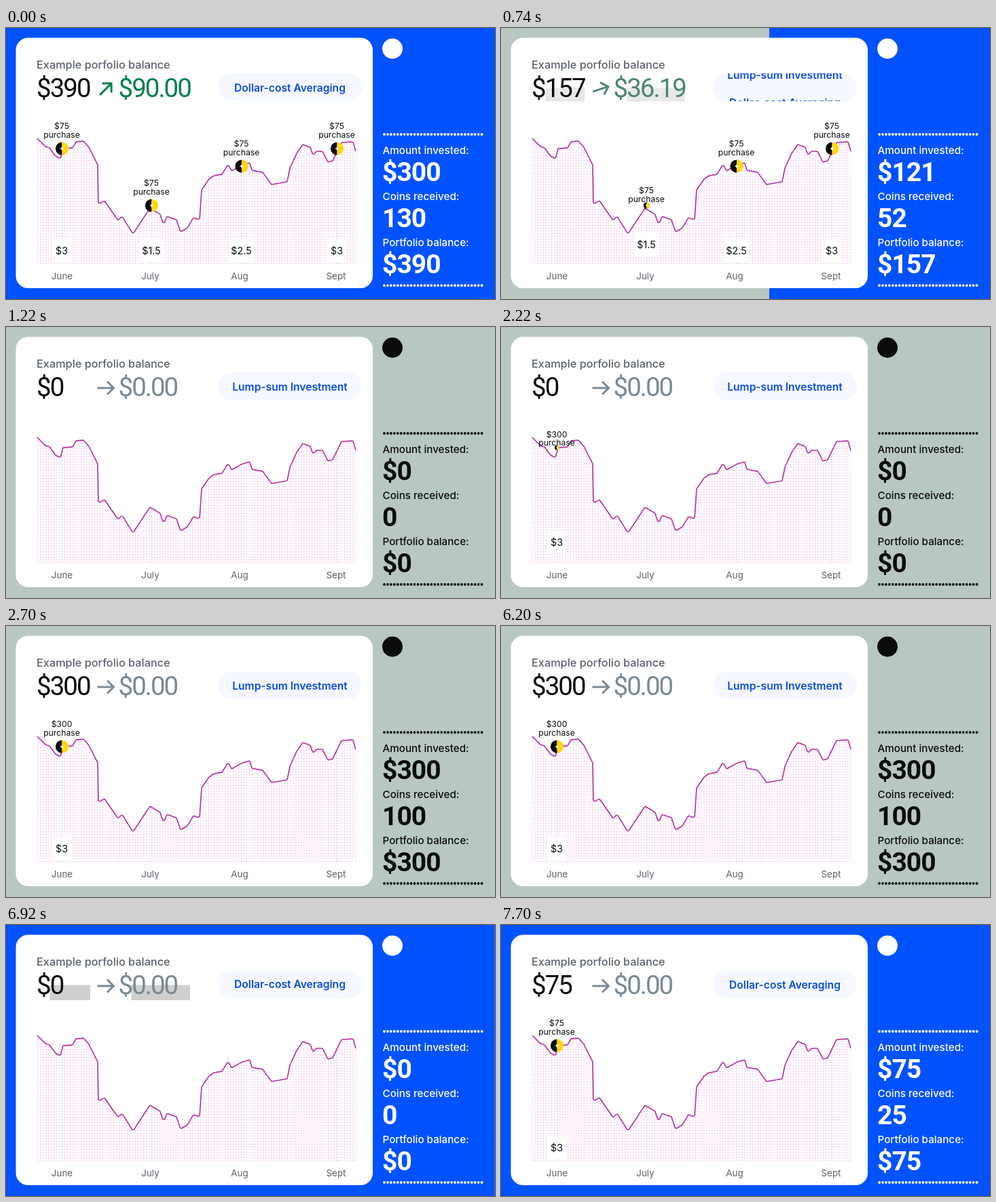
Animation of 720 by 400 pixels, one loop 8 s. Source, as an HTML page with a canvas:

```html
<!DOCTYPE html>
<html lang="en">
<head>
<meta charset="utf-8">
<title>Portfolio balance</title>
<style>
html, body { margin: 0; width: 100%; height: 100%; overflow: hidden; background: #0052ff; }
canvas { display: block; width: 720px; height: 400px; }
</style>
</head>
<body>
<canvas id="stage" width="720" height="400"></canvas>
<script>
const ctx = document.getElementById('stage').getContext('2d');
const LOOP = 8000, STEP = 60;
const BLUE = '#0052ff', SAGE = '#b9c7c3', INK = '#0a0b0d';
const SANS = 'Inter, sans-serif', DIGITS = 'Roboto, sans-serif';

// Turning points of the price, x and y in turn
const LINE = [46,163, 58,175, 64,177, 73,189, 80,193, 84,178, 98,177, 103,168, 114,167,
  122,176, 135,202, 136,260, 145,255, 165,284, 171,278, 187,304, 202,281, 212,266,
  227,275, 232,291, 237,278, 251,283, 257,301, 267,295, 276,280, 285,283, 288,239,
  299,223, 306,218, 318,216, 327,201, 332,211, 348,202, 359,199, 362,210, 378,213,
  391,231, 414,227, 418,207, 428,185, 437,172, 448,176, 452,188, 457,182, 466,182,
  474,198, 481,196, 494,169, 511,168];
const END = { x: 515, y: 182 };

const MARKS = [
  { month: 'June', mx: 82.5, x: 82.5, y: 178, price: '$3' },
  { month: 'July', mx: 212.5, x: 214.5, y: 262, price: '$1.5' },
  { month: 'Aug', mx: 344, x: 347, y: 204, price: '$2.5' },
  { month: 'Sept', mx: 486, x: 487.5, y: 178, price: '$3' }
];

const clamp = v => Math.max(0, Math.min(1, v));
const lerp = (a, b, k) => a + (b - a) * k;
const easeOut = k => 1 - Math.pow(1 - clamp(k), 3);
const sweep = k => 1 - Math.pow(1 - Math.pow(clamp(k), 1.4), 3.73);
const mix = (a, b, k) => `rgb(${a.map((v, i) => Math.round(lerp(v, b[i], k)))})`;
const elapsed = (t, start) => Math.floor((t - start) / STEP + 1e-6) * STEP;

function text(str, x, y, font, color, align = 'left', spacing = 0) {
  ctx.font = font;
  ctx.fillStyle = color;
  ctx.textAlign = align;
  ctx.letterSpacing = spacing + 'px';
  ctx.fillText(str, x, y);
}

function box(x, y, w, h, r, color) {
  ctx.fillStyle = color;
  ctx.beginPath();
  ctx.roundRect(x, y, w, h, r);
  ctx.fill();
}

function clipped(x, y, w, h, draw) {
  ctx.save();
  ctx.beginPath();
  ctx.rect(x, y, w, h);
  ctx.clip();
  draw();
  ctx.restore();
}

function tracePrice(g) {
  g.beginPath();
  g.moveTo(LINE[0], LINE[1]);
  for (let i = 2; i < LINE.length; i += 2) {
    const nx = LINE[i + 2] ?? END.x, ny = LINE[i + 3] ?? END.y;
    g.arcTo(LINE[i], LINE[i + 1], nx, ny, 2);
  }
  g.lineTo(END.x, END.y);
}

function makeChart() {
  const c = document.createElement('canvas');
  c.width = 720;
  c.height = 400;
  const g = c.getContext('2d');
  g.save();
  tracePrice(g);
  g.lineTo(516, 349);
  g.lineTo(45, 349);
  g.closePath();
  g.clip();
  g.fillStyle = '#fffafe';
  g.fillRect(45, 150, 472, 199);
  g.fillStyle = '#e9bfe5';
  for (let y = 151; y < 349; y += 4) {
    for (let x = 46; x < 517; x += 4) g.fillRect(x, y, 1.2, 1.2);
  }
  g.strokeStyle = '#b5daf2';
  g.setLineDash([2, 2]);
  for (const m of MARKS) {
    g.beginPath();
    g.moveTo(m.x, 150);
    g.lineTo(m.x, 348);
    g.stroke();
  }
  g.restore();
  tracePrice(g);
  g.strokeStyle = '#b02f9d';
  g.lineWidth = 1.6;
  g.lineJoin = 'round';
  g.stroke();
  return c;
}
const chart = makeChart();

function coin(x, y, r) {
  ctx.fillStyle = INK;
  ctx.beginPath();
  ctx.arc(x, y, r, Math.PI / 2, Math.PI * 1.5);
  ctx.fill();
  ctx.fillStyle = '#ffd60f';
  ctx.beginPath();
  ctx.arc(x, y, r, -Math.PI / 2, Math.PI / 2);
  ctx.fill();
  const s = r * 0.45;
  ctx.fillStyle = '#fff';
  ctx.beginPath();
  ctx.moveTo(x, y - s);
  ctx.quadraticCurveTo(x, y, x + s, y);
  ctx.quadraticCurveTo(x, y, x, y + s);
  ctx.quadraticCurveTo(x, y, x - s, y);
  ctx.quadraticCurveTo(x, y, x, y - s);
  ctx.fill();
}

function marker(m, amount, p) {
  if (p <= 0.05) return;
  const rest = 1 - p, w = m.price.length > 2 ? 37 : 29, py = -18 * rest;
  box(m.x - w / 2, 311.5 + py, w, 34, 2, '#fff');
  text(m.price, m.x - 0.5, 334 + py, '400 14.3px ' + SANS, INK, 'center');
  coin(m.x, m.y, 9.6 * p);
  const y = m.y + 22 * rest;
  text('$' + amount, m.x - 0.5, y - 29, '400 12.2px ' + SANS, INK, 'center');
  text('purchase', m.x - 0.5, y - 16.5, '400 12.2px ' + SANS, INK, 'center');
}

function arrow(turn, color) {
  ctx.save();
  ctx.translate(147, 90);
  ctx.rotate(-Math.PI / 4 * turn);
  ctx.strokeStyle = color;
  ctx.lineWidth = 3;
  ctx.beginPath();
  ctx.moveTo(-12.5, 0);
  ctx.lineTo(11, 0);
  ctx.moveTo(2, -9.5);
  ctx.lineTo(11.5, 0);
  ctx.lineTo(2, 9.5);
  ctx.stroke();
  ctx.restore();
}

function plate(x, w, h, lean, alpha) {
  ctx.fillStyle = `rgba(0,0,0,${alpha})`;
  ctx.beginPath();
  ctx.moveTo(x + lean, 88.5);
  ctx.lineTo(x + w, 88.5);
  ctx.lineTo(x + w - lean / 2, 88.5 + h);
  ctx.lineTo(x, 88.5 + h);
  ctx.fill();
}

function panel(bg, fg, s) {
  ctx.fillStyle = bg;
  ctx.fillRect(0, 0, 720, 400);
  ctx.fillStyle = fg;
  ctx.beginPath();
  ctx.arc(569, 30.5, 15, 0, 7);
  ctx.fill();
  for (const y of [157, 380]) {
    for (let i = 0; i < 30; i++) {
      ctx.beginPath();
      ctx.arc(557 + i * 4.95, y, 1.9, 0, 7);
      ctx.fill();
    }
  }
  const rows = [['Amount invested:', '$' + s.invested], ['Coins received:', '' + s.coins],
    ['Portfolio balance:', '$' + s.balance]];
  rows.forEach(([label, value], i) => {
    text(label, 554.5, 186 + i * 68, '500 15.2px ' + SANS, fg);
    text(value, 554, 226 + i * 68, '700 39px ' + DIGITS, fg, 'left', -1);
  });
}

// Everything shown at time t
function stateAt(t) {
  const s = { invested: 300, coins: 130, balance: 390, gain: 90, wipe: 0, plate: -1,
    toSage: true, amount: 75, marks: [1, 1, 1, 1] };
  const setCounts = (a, c, b) => {
    s.invested = Math.round(a);
    s.coins = Math.round(c);
    s.balance = Math.round(b);
  };
  const enter = (start, length, sum, coins) => {
    const e = elapsed(t, start);
    if (e < 0) return setCounts(0, 0, 0);
    const k = easeOut(e / length);
    setCounts(sum * k, coins * k, sum * k);
    s.marks[0] = easeOut((e + STEP) / 420);
  };
  const leave = start => {
    const e = elapsed(t, start), k = sweep(e / 780);
    s.wipe = k;
    s.plate = e;
    return { e, left: 1 - clamp(k * 1.09) };
  };

  if (t < 500) return s;
  if (t < 1220) {
    const { e, left } = leave(500);
    setCounts(300 * left, 130 * left, 390 * left);
    s.gain = 90 * left;
    s.marks = s.marks.map((_, i) => 1 - clamp((e - 20 - i * 120) / 200));
    return s;
  }
  s.gain = 0;
  s.marks = [0, 0, 0, 0];
  s.wipe = 1;
  if (t < 6200) {
    s.amount = 300;
    enter(2220, 480, 300, 100);
  } else if (t < 6980) {
    s.toSage = false;
    s.amount = 300;
    const { e, left } = leave(6200);
    setCounts(300 * left, 100 * left, 300 * left);
    s.marks[0] = 1 - clamp((e - 20) / 200);
  } else {
    s.toSage = false;
    enter(7040, 660, 75, 25);
  }
  return s;
}

function draw(t) {
  const s = stateAt(t), edge = 720 * s.wipe;
  const sage = () => panel(SAGE, INK, s), blue = () => panel(BLUE, '#fff', s);
  clipped(0, 0, edge, 400, s.toSage ? sage : blue);
  clipped(edge, 0, 720 - edge, 400, s.toSage ? blue : sage);

  box(14.5, 14.5, 525.5, 369.5, 18, '#fff');
  text('Example porfolio balance', 45, 60, '500 16.3px ' + SANS, '#5b616e');

  if (s.plate > 0) {
    const e = s.plate;
    const alpha = e < 480 ? 0.46 * clamp((e - 180) / 300) : lerp(0.46, 0.19, (e - 480) / 240);
    const k = clamp((e - 480) / 240), h = lerp(20, 22.5, k), lean = lerp(2, 0, k);
    plate(64.5, 59.5, h, lean, alpha);
    plate(184.5, 86.5, h, lean, alpha);
  }
  const up = s.gain / 90;
  const tone = mix([123, 138, 148], [9, 128, 72], up);
  text('$' + s.balance, 45, 101.5, '400 38.5px ' + DIGITS, INK, 'left', -2);
  arrow(up, tone);
  text('$' + s.gain.toFixed(2), 165.5, 101.5, '400 38.5px ' + DIGITS, tone, 'left', -2);

  box(312, 67, 212, 41, 20.5, '#f5f8ff');
  clipped(312, 67, 212, 41, () => {
    const names = ['Dollar-cost Averaging', 'Lump-sum Investment'];
    if (!s.toSage) names.reverse();
    names.forEach((name, i) => {
      const y = 93.5 + 41 * (s.wipe - i);
      text(name, 418, y, '600 15.6px ' + SANS, '#0a4be0', 'center');
    });
  });

  ctx.drawImage(chart, 0, 0);
  MARKS.forEach((m, i) => {
    text(m.month, m.mx, 370.5, '400 13.4px ' + SANS, '#5b616e', 'center');
    marker(m, s.amount, s.marks[i]);
  });
}

function frame() {
  draw(performance.now() % LOOP);
  requestAnimationFrame(frame);
}
frame();
</script>
</body>
</html>
```
